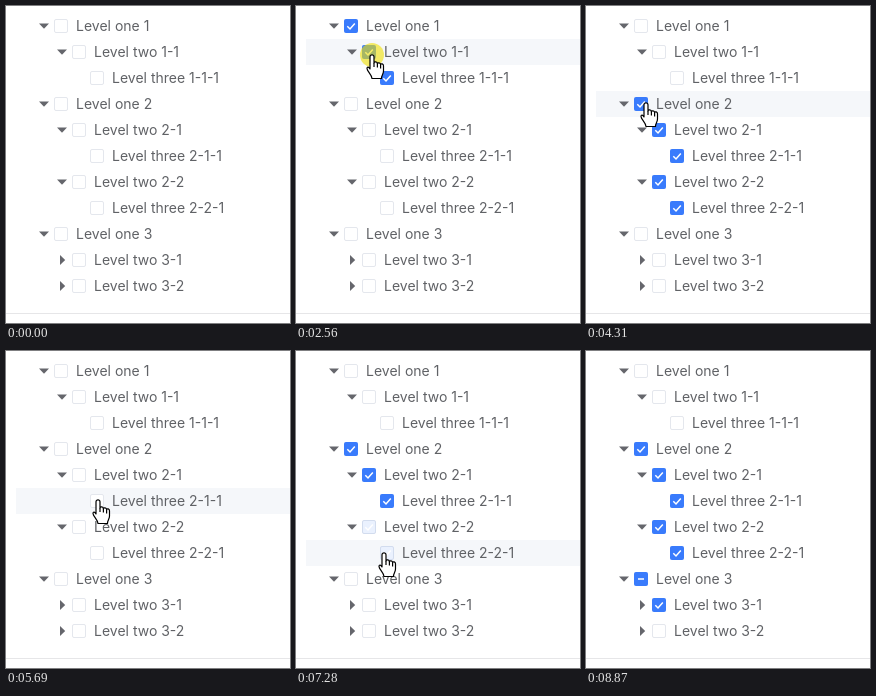
Animation, 284 px wide and 317 px high, one loop 9730 ms. Source, as an HTML page:

```html
<!DOCTYPE html>
<html lang="en">
<head>
<meta charset="utf-8">
<title>Checkbox tree</title>
<style>
  html, body { margin: 0; height: 100%; overflow: hidden; background: #fff; }
  svg { display: block; }
  text { font: 14px Inter, Arial, sans-serif; fill: #606266; }
  .caret { fill: #65666c; }
  .mark { fill: none; stroke: #fff; stroke-width: 1.5; }
</style>
</head>
<body>
<svg id="stage" width="284" height="317" viewBox="0 0 284 317">
  <rect id="hover" x="10" width="274" height="26" fill="#f5f7fa"/>
  <path d="M0 307.5H284" stroke="#e6e6e8"/>
  <g id="tree"></g>
  <circle id="press" r="12" fill="#f0e000" opacity=".6"/>
  <g id="hand" fill="#fff" stroke="#000" stroke-width="1.2" stroke-linejoin="round">
    <path d="M-2 14V1.8a2 2 0 0 1 4 0V8c.3-1.6 3.3-1.4 3.4.6 .4-1.3 3-1 3.2.8 .5-1.1 2.9-.7 2.9 1.4v5.2c0 3-2 4-2 7.5H0c0-3.5-5-7.2-5-10 0-2 2-1.6 3 .5z"/>
    <path d="M2 8v4M5.4 8.6v4M8.6 9.4v4" fill="none"/>
  </g>
</svg>
<script>
const LOOP = 9730, ROW = 26, TOP = 7;
const OFF = 0, ON = 1, PARTIAL = 2;
const byId = id => document.getElementById(id);
const hover = byId('hover'), press = byId('press'), hand = byId('hand');

// [indent level, label, collapsed]
const items = [
  [0, 'Level one 1'], [1, 'Level two 1-1'], [2, 'Level three 1-1-1'],
  [0, 'Level one 2'], [1, 'Level two 2-1'], [2, 'Level three 2-1-1'],
  [1, 'Level two 2-2'], [2, 'Level three 2-2-1'],
  [0, 'Level one 3'], [1, 'Level two 3-1', true], [1, 'Level two 3-2', true]
];

// Each click: button down, button up, fade length, new state by row
const clicks = [
  { down: 1290, up: 1430, fade: 270, set: { 0: ON, 1: ON, 2: ON } },
  { down: 2560, up: 2710, fade: 130, set: { 0: OFF, 1: OFF, 2: OFF } },
  { down: 4030, up: 4100, fade: 220, set: { 3: ON, 4: ON, 5: ON, 6: ON, 7: ON } },
  { down: 4790, up: 4930, fade: 130, set: { 3: OFF, 4: OFF, 5: OFF, 6: OFF, 7: OFF } },
  { down: 5760, up: 5830, fade: 210, set: { 3: PARTIAL, 4: ON, 5: ON } },
  { down: 7150, up: 7220, fade: 210, set: { 3: ON, 6: ON, 7: ON } },
  { down: 8040, up: 8170, fade: 140, set: { 8: PARTIAL, 9: ON } }
];

const easeIn = p => p * p;
const easeOut = p => 1 - (1 - p) ** 2;
const smooth = p => p * p * (3 - 2 * p);
const sharp = p => p < .5 ? 4 * p ** 3 : 1 - 4 * (1 - p) ** 3;

// The pointer moves in visible steps, the last one at `end`
const ENTER = 130, LEAVE = 8870, ORIGIN = [250, 321];
const moves = [
  { start: ENTER, end: 1090, steps: 15, to: [76, 49], ease: easeOut },
  { start: 3090, end: 3430, steps: 6, to: [62, 95], ease: smooth },
  { start: 3630, end: 3700, steps: 2, to: [60, 97], ease: smooth },
  { start: 5200, end: 5690, steps: 8, to: [92, 149], ease: smooth },
  { start: 6520, end: 7010, steps: 8, to: [88, 202], ease: smooth },
  { start: 7630, end: 7970, steps: 6, to: [74, 253], ease: smooth },
  { start: 8610, end: LEAVE, steps: 5, to: [225, 328], ease: easeIn }
];

const boxes = items.map(([level, label, collapsed], i) => {
  const row = document.createElementNS('http://www.w3.org/2000/svg', 'g');
  row.setAttribute('transform', `translate(${level * 18} ${TOP + ROW * i + 13})`);
  const caret = level === 2 ? '' : collapsed ? 'M36 -5L41.2 0L36 5z' : 'M33 -2.5H43L38 2.7z';
  row.innerHTML = `
    <path class="caret" d="${caret}"/>
    <rect x="48.5" y="-6.5" width="13" height="13" rx="1.5" fill="#fff" stroke="#e4e7ed"/>
    <g class="fill">
      <rect x="48" y="-7" width="14" height="14" rx="2" fill="#397bfc"/>
      <path class="mark"/>
    </g>
    <text x="70" y="5">${label}</text>`;
  byId('tree').append(row);
  return { fill: row.querySelector('.fill'), mark: row.querySelector('.mark') };
});

function pointerAt(t) {
  let pos = ORIGIN;
  for (const { start, end, steps, to, ease } of moves) {
    if (t < start) break;
    const step = Math.floor((t - start) / (end - start) * (steps - 1) + 1e-6) + 1;
    const p = ease(Math.min(1, step / steps));
    pos = pos.map((from, axis) => from + (to[axis] - from) * p);
  }
  return pos;
}

function drawBox({ fill, mark }, row, t) {
  let state = OFF, shape = ON, opacity = 0;
  for (const { up, fade, set } of clicks) {
    if (t < up || !(row in set)) continue;
    const next = set[row], p = sharp(Math.min(1, (t - up) / fade));
    if (!next !== !state) opacity = next ? p : 1 - p;
    if (next) shape = next;
    state = next;
  }
  fill.setAttribute('opacity', opacity);
  mark.setAttribute('d', shape === PARTIAL ? 'M52 0H58' : 'M51.3 .3L54 3L58.8 -2.6');
}

function draw(t) {
  const [x, y] = pointerAt(t);
  const present = t >= ENTER && t < LEAVE;
  const row = Math.floor((y - TOP) / ROW);
  const show = (node, on) => node.setAttribute('visibility', on ? 'visible' : 'hidden');
  const place = node => node.setAttribute('transform', `translate(${x} ${y})`);

  place(hand);
  place(press);
  hover.setAttribute('y', TOP + ROW * row);
  show(hand, present);
  show(hover, present && row < items.length);
  show(press, clicks.some(c => t >= c.down && t < c.up));
  boxes.forEach((box, i) => drawBox(box, i, t));
}

const began = performance.now();
function tick() {
  draw((performance.now() - began) % LOOP);
  requestAnimationFrame(tick);
}
tick();
</script>
</body>
</html>
```
